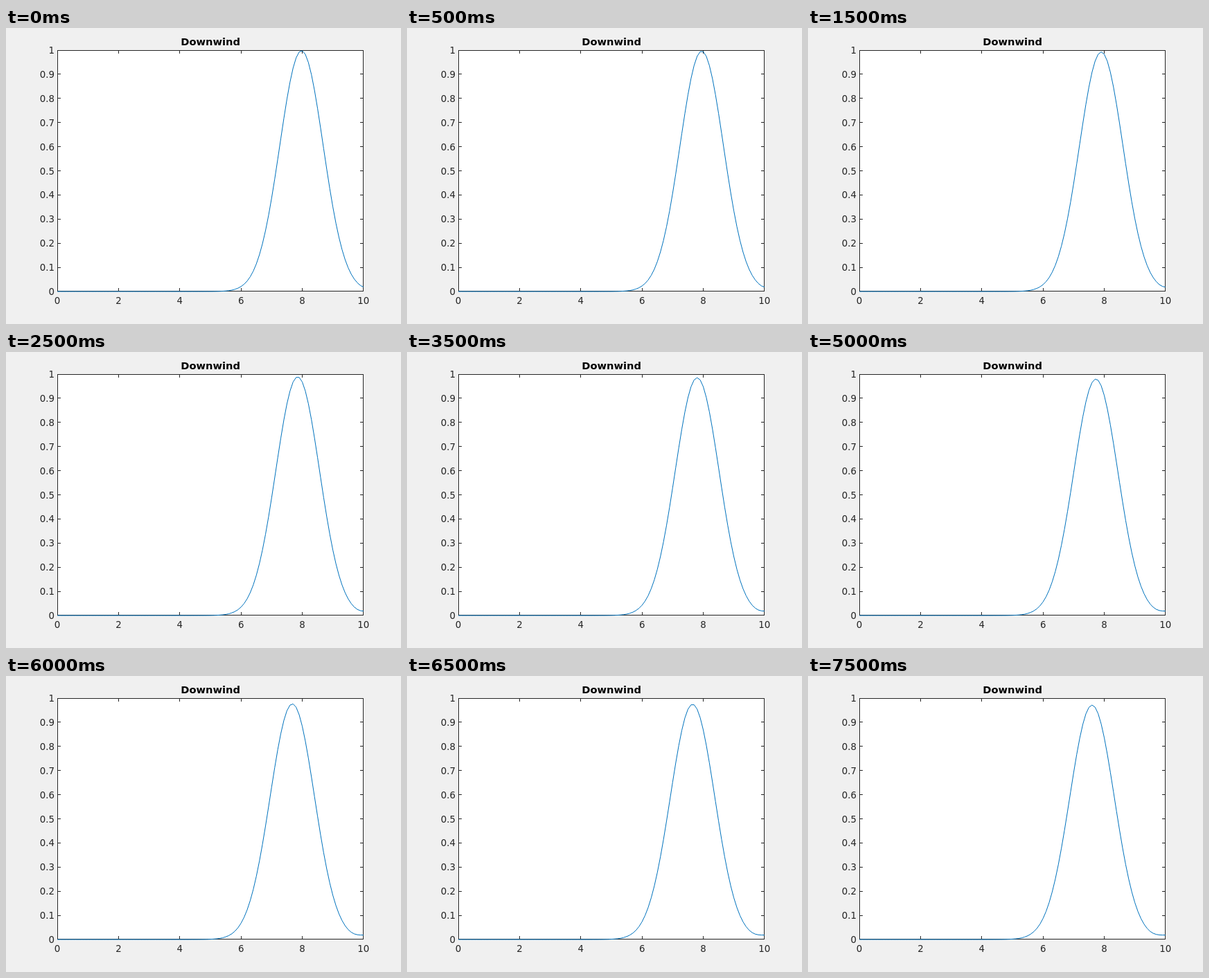
Animation of 570x428 px, one loop 8 s. Source, as an HTML page:

```html
<!DOCTYPE html>
<html lang="en">
<head>
<meta charset="utf-8">
<title>Downwind</title>
<style>
  html, body { margin: 0; width: 100%; height: 100%; overflow: hidden; background: #f0f0f0; }
  svg { display: block; }
  text { font: 13.33px "DejaVu Sans", sans-serif; fill: #262626; }
  .title { font-weight: bold; font-size: 14.67px; fill: #000; }
  .axes { fill: none; stroke: #262626; shape-rendering: crispEdges; }
  .curve { fill: none; stroke: #0072bd; stroke-linejoin: round; }
</style>
</head>
<body>
<svg width="570" height="428" viewBox="0 0 570 428">
  <rect x="74" y="32" width="442" height="349" fill="#fff"/>
  <path class="axes" id="axes"/>
  <g id="labels"></g>
  <text class="title" x="295.2" y="25" text-anchor="middle">Downwind</text>
  <path class="curve" id="curve"/>
</svg>
<script>
const LOOP = 8000, STEP = 500, COURANT = 0.25, CELLS = 100, TICK = 4;
const LEFT = 74, TOP = 32, RIGHT = 515, BOTTOM = 380;
const byId = id => document.getElementById(id);
const px = x => 74.1 + x * 44.175;
const py = u => 381 - u * 349;
const snap = v => Math.floor(v) + 0.5;

function addLabel(value, x, y, anchor) {
  const label = document.createElementNS("http://www.w3.org/2000/svg", "text");
  label.setAttribute("x", x);
  label.setAttribute("y", y);
  label.setAttribute("text-anchor", anchor);
  label.textContent = value;
  byId("labels").append(label);
}

function drawAxes() {
  let d = `M${LEFT + 0.5} ${TOP + 0.5}H${RIGHT + 0.5}V${BOTTOM + 0.5}H${LEFT + 0.5}Z`;
  for (let x = 0; x <= 10; x += 2) {
    const sx = snap(px(x));
    d += `M${sx} ${TOP}v${TICK + 1}M${sx} ${BOTTOM + 1}v${-TICK - 1}`;
    addLabel(x, px(x), 399, "middle");
  }
  for (let i = 0; i <= 10; i++) {
    const sy = snap(380.9 - i * 34.88);
    d += `M${LEFT} ${sy}h${TICK + 1}M${RIGHT + 1} ${sy}h${-TICK - 1}`;
    addLabel(i / 10, 70, Math.round(py(i / 10)) + 5, "end");
  }
  byId("axes").setAttribute("d", d);
}

// Left-moving advection of a Gaussian with a fixed right boundary.
const advance = u => u.map((v, j) => j < CELLS ? v + COURANT * (u[j + 1] - v) : v);

function waveAfter(steps) {
  let u = Array.from({ length: CELLS + 1 }, (_, j) => Math.exp(-((j / 10 - 8) ** 2)));
  while (steps-- > 0) u = advance(u);
  return u;
}

const toPath = u => "M" + u.map((v, j) => `${px(j / 10).toFixed(2)} ${py(v).toFixed(2)}`).join("L");
const paths = Array.from({ length: LOOP / STEP }, (_, i) => toPath(waveAfter(i + 1)));

function render(time) {
  byId("curve").setAttribute("d", paths[Math.floor((time % LOOP) / STEP)]);
}

function tick() {
  render(performance.now());
  requestAnimationFrame(tick);
}

drawAxes();
tick();
</script>
</body>
</html>
```
